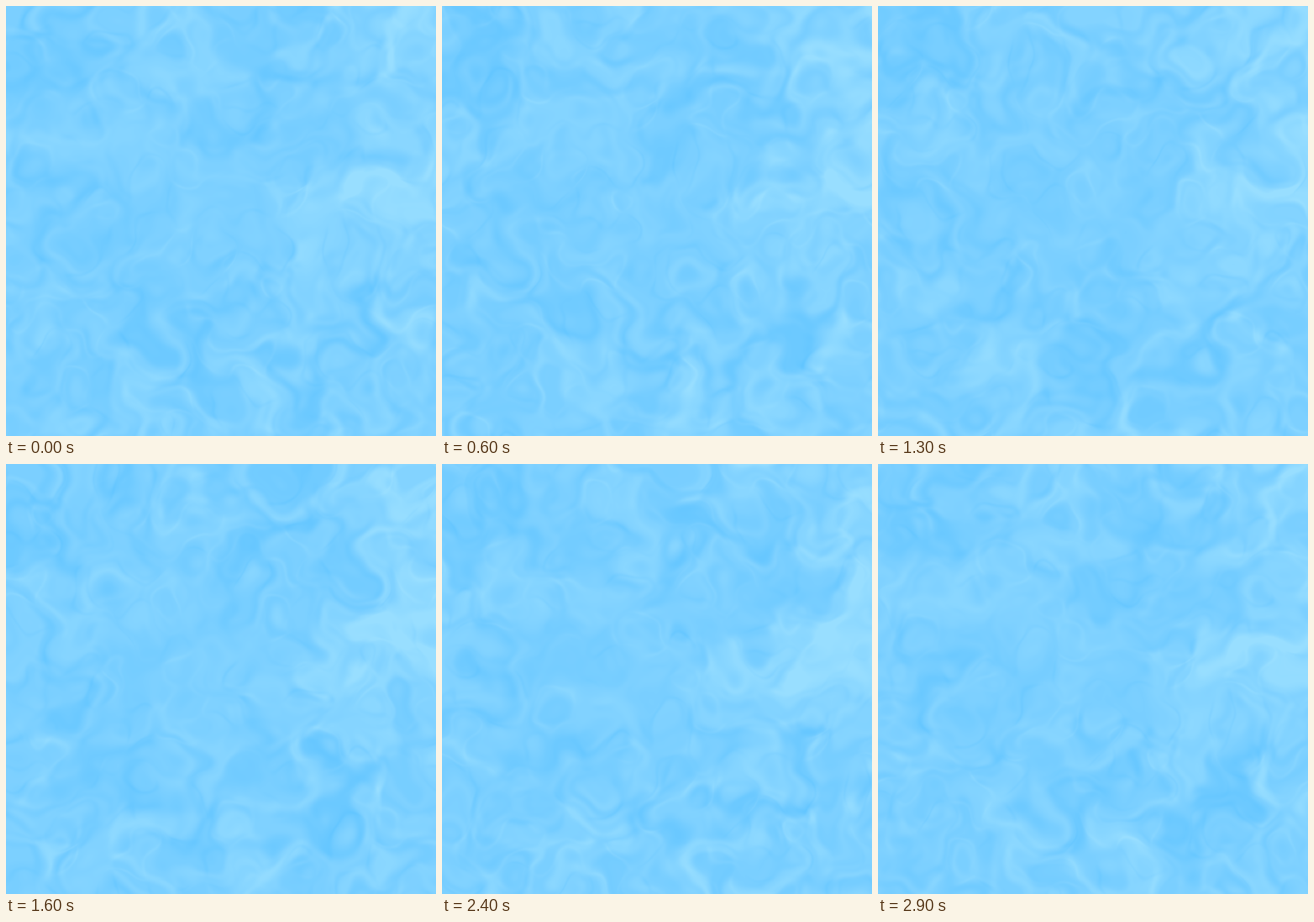
These frames come from a looping animation (512x512 px, 3 s). An HTML page with a canvas:

```html
<!DOCTYPE html>
<html lang="en">
<head>
<meta charset="utf-8">
<title>Water</title>
<style>
  html, body { margin: 0; width: 100%; height: 100%; overflow: hidden; background: #7dd0ff; }
  canvas { display: block; width: 512px; height: 512px; }
</style>
</head>
<body>
<canvas id="stage" width="512" height="512"></canvas>
<script>
const SIZE = 512, MASK = SIZE - 1, LOOP = 3000, STEP = 100;
const ctx = document.getElementById('stage').getContext('2d');
const image = ctx.createImageData(SIZE, SIZE);
const pixels = new Uint32Array(image.data.buffer);

const fade = t => t * t * t * (t * (t * 6 - 15) + 10);
const mix = (a, b, t) => a + (b - a) * t;
const clamp = (v, lo, hi) => v < lo ? lo : v > hi ? hi : v;

function seeded(seed) {
  return () => {
    seed = (seed + 0x6d2b79f5) | 0;
    let t = Math.imul(seed ^ (seed >>> 15), 1 | seed);
    t = (t + Math.imul(t ^ (t >>> 7), 61 | t)) ^ t;
    return ((t ^ (t >>> 14)) >>> 0) / 4294967296;
  };
}

const fill = rule => Float32Array.from({ length: SIZE * SIZE }, (_, k) => rule(k & MASK, k >> 9, k));

// Gradient noise that repeats after one tile
function noise(cells, seed) {
  const rand = seeded(seed);
  const angles = Array.from({ length: cells * cells }, () => rand() * Math.PI * 2);
  const gx = angles.map(Math.cos), gy = angles.map(Math.sin);
  const dot = (ix, iy, dx, dy) => {
    const k = (iy % cells) * cells + ix % cells;
    return gx[k] * dx + gy[k] * dy;
  };
  return fill((x, y) => {
    const u = x * cells / SIZE, ix = Math.floor(u), fx = u - ix, sx = fade(fx);
    const v = y * cells / SIZE, iy = Math.floor(v), fy = v - iy;
    const top = mix(dot(ix, iy, fx, fy), dot(ix + 1, iy, fx - 1, fy), sx);
    const low = mix(dot(ix, iy + 1, fx, fy - 1), dot(ix + 1, iy + 1, fx - 1, fy - 1), sx);
    return mix(top, low, fade(fy));
  });
}

// Still light: broad patches plus grain that is calm in the middle
const patches = [ // x, y, radius, strength
  [495, 190, 90, .7], [480, 40, 55, .5], [425, 260, 70, .3], [325, 440, 50, .3],
  [195, 30, 45, .35], [45, 60, 50, -.55], [350, 120, 55, -.4], [110, 290, 80, -.2],
  [240, 430, 38, -.4], [400, 390, 45, -.3]
];
const coarse = noise(8, 11), fine = noise(15, 12);
const base = fill((x, y, k) => {
  const calm = Math.exp(-((x - 210) ** 2 + (y - 225) ** 2) / 150 ** 2);
  let v = (1.1 * coarse[k] + .65 * fine[k]) * (1 - .7 * calm);
  for (const [px, py, r, a] of patches) v += a * Math.exp(-((x - px) ** 2 + (y - py) ** 2) / (r * r));
  return v;
});

// Drifting tile that bends the light, with thin crests along its contours
function push(seed) {
  const wide = noise(8, seed), tight = noise(16, seed + 1);
  return fill((x, y, k) => 120 * wide[k] + 34 * tight[k]);
}
const pushX = push(21), pushY = push(31);
const crest = fill((x, y, k) =>
  .28 * clamp(pushY[k] / 35, -1, 1) * Math.exp(-((pushX[k] / 5) ** 2)) +
  .22 * clamp(pushX[k] / 35, -1, 1) * Math.exp(-(((pushY[k] - 12) / 5) ** 2)));

const dark = [98, 197, 255], mid = [125, 208, 255], light = [152, 222, 255];
const palette = Uint32Array.from({ length: 256 }, (_, i) => {
  const v = i / 127.5 - 1, end = v < 0 ? dark : light;
  const [r, g, b] = mid.map((c, k) => Math.round(mix(c, end[k], Math.abs(v))));
  return (255 << 24 | b << 16 | g << 8 | r) >>> 0;
});

function sample(x, y) {
  x = clamp(x, 0, SIZE - 1.01);
  y = clamp(y, 0, SIZE - 1.01);
  const ix = x | 0, iy = y | 0, fx = x - ix, k = iy * SIZE + ix;
  return mix(mix(base[k], base[k + 1], fx), mix(base[k + SIZE], base[k + SIZE + 1], fx), y - iy);
}

function draw(step) {
  const shift = Math.round(SIZE * step * STEP / LOOP);
  for (let y = 0, p = 0; y < SIZE; y++) {
    const row = ((y + shift) & MASK) * SIZE;
    for (let x = 0; x < SIZE; x++, p++) {
      const k = row + ((x + shift) & MASK);
      const v = sample(x + pushX[k], y + pushY[k]) + crest[k];
      pixels[p] = palette[clamp(v * 127.5 + 127.5, 0, 255) | 0];
    }
  }
  ctx.putImageData(image, 0, 0);
}

const start = performance.now();
let shown = -1;
function tick() {
  const step = Math.floor((performance.now() - start) % LOOP / STEP);
  if (step !== shown) draw(shown = step);
  requestAnimationFrame(tick);
}
tick();
</script>
</body>
</html>
```
